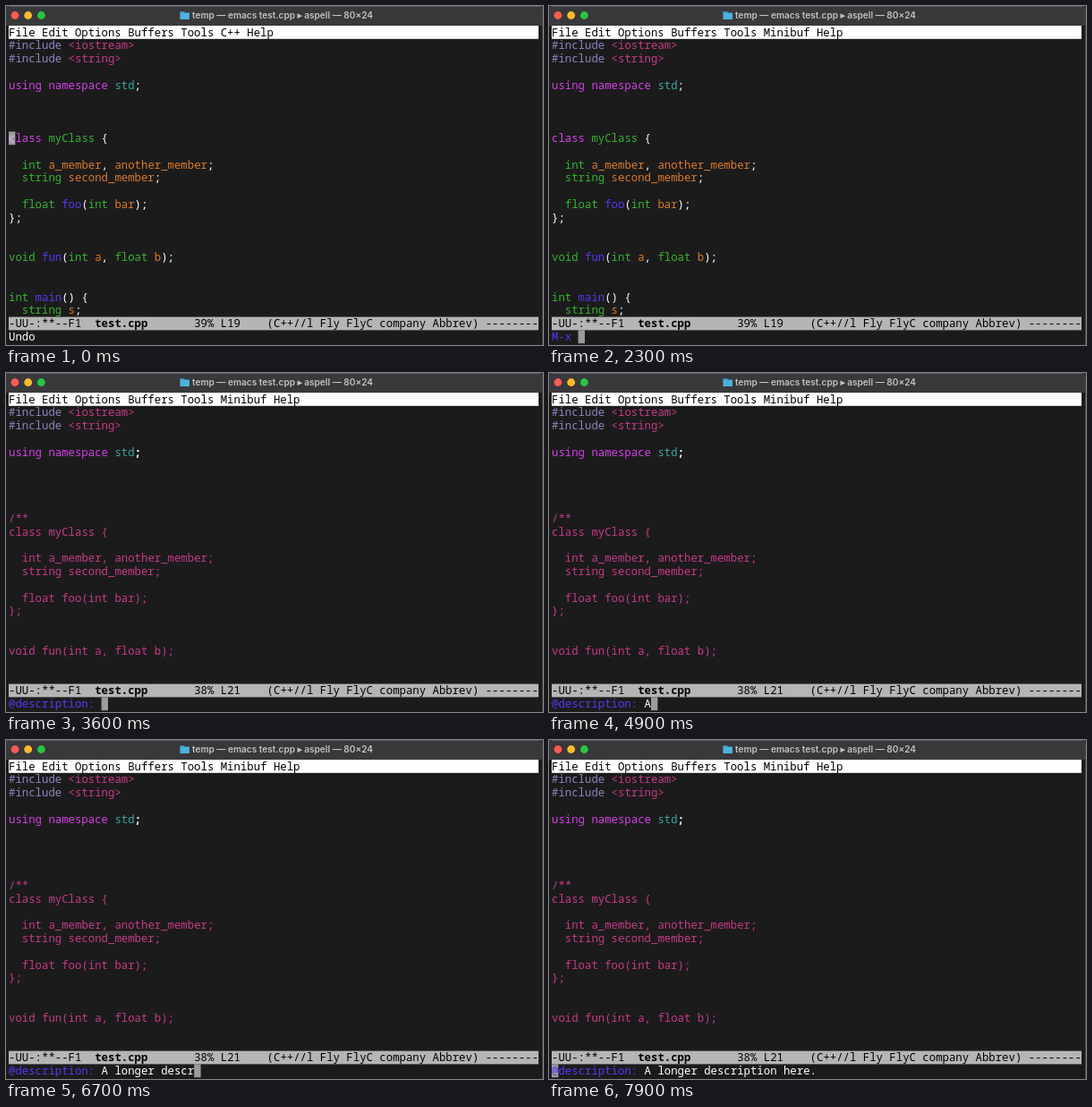
Write an HTML page with a canvas that moves like this. It is 600x379 px and loops after 8000 ms.

```html
<!DOCTYPE html>
<html lang="en">
<head>
<meta charset="utf-8">
<title>Terminal editor</title>
<style>
html, body { margin: 0; width: 100%; height: 100%; overflow: hidden; background: #1c1b1c; }
canvas { display: block; width: 600px; height: 379px; }
</style>
</head>
<body>
<canvas id="stage"></canvas>
<script>
const W = 600, H = 379, LOOP = 8000;
const X0 = 3, Y0 = 22, CW = 7.4, RH = 14.8;
const MONO = '12.33px "Noto Sans Mono", "DejaVu Sans Mono", monospace';
const C = {
  bg: '#1c1b1c', bar: '#b5b5b5', cursor: '#9c9a9c', w: '#ffffff',
  k: '#d43fe8', t: '#35b52f', v: '#d97a2b', f: '#5a35f2',
  s: '#c53b86', p: '#8c83bd', n: '#3aa79f', x: '#000000'
};

const canvas = document.getElementById('stage');
const g = canvas.getContext('2d');
const dpr = window.devicePixelRatio || 1;
canvas.width = W * dpr;
canvas.height = H * dpr;

// Each part is a colour key, a colon and its text.
const header = [
  [1, 'p:#include ', 's:<iostream>'],
  [2, 'p:#include ', 's:<string>']
];
const body = [
  [8, 'k:class ', 't:myClass ', 'w:{'],
  [10, 't:  int ', 'v:a_member', 'w:, ', 'v:another_member', 'w:;'],
  [11, 't:  string ', 'v:second_member', 'w:;'],
  [13, 't:  float ', 'f:foo', 'w:(', 't:int ', 'v:bar', 'w:);'],
  [14, 'w:};'],
  [17, 't:void ', 'f:fun', 'w:(', 't:int ', 'v:a', 'w:, ', 't:float ', 'v:b', 'w:);'],
  [20, 't:int ', 'f:main', 'w:() {'],
  [21, 't:  string ', 'v:s', 'w:;']
];
const answer = 'A longer description here.';

const T = { prompt: 1500, comment: 3200, first: 4750, rest: 5320, fast: 6650, done: 7700 };

function cell(row, col, cols, color) {
  g.fillStyle = color;
  g.fillRect(X0 + col * CW, Y0 + row * RH, cols * CW, RH);
}

function put(row, col, text, color, bold) {
  g.font = (bold ? 'bold ' : '') + MONO;
  g.fillStyle = color;
  g.fillText(text, X0 + col * CW, Y0 + row * RH + 11.6);
}

function line([row, ...parts], shift = 0, color) {
  let col = 0;
  for (const part of parts) {
    const text = part.slice(2);
    put(row + shift, col, text, color || C[part[0]]);
    col += text.length;
  }
}

function disc(x, color) {
  g.fillStyle = color;
  g.beginPath();
  g.arc(x, 10.5, 4.4, 0, 7);
  g.fill();
}

function titleBar() {
  g.fillStyle = '#39383a';
  g.fillRect(0, 0, W, Y0);
  g.fillStyle = '#5b5a5c';
  g.fillRect(4, 0, W - 8, 1);
  disc(10, '#fc5b55');
  disc(24.7, '#fdbc2e');
  disc(39.4, '#28c63f');
  g.fillStyle = '#2f8fb8';
  g.fillRect(194.5, 6, 5, 3);
  g.fillStyle = '#4bb2dc';
  g.fillRect(194.5, 7.5, 10.5, 7.5);
  g.font = '600 10.1px Inter, "Open Sans", sans-serif';
  g.fillStyle = '#c4c3c4';
  g.fillText('temp — emacs test.cpp ▸ aspell — 80×24', 208, 13.8);
}

function typed(t) {
  if (t < T.first) return 0;
  if (t < T.rest) return 1;
  const n = t < T.fast
    ? 2 + Math.floor((t - T.rest) / 110)
    : 14 + Math.floor((t - T.fast) / 80);
  return Math.min(n, answer.length);
}

function minibuffer(t) {
  if (t < T.prompt) {
    put(23, 0, 'Undo', C.w);
  } else if (t < T.comment) {
    put(23, 0, 'M-x', C.f);
    cell(23, 4, 1, C.cursor);
  } else {
    const n = typed(t);
    cell(23, t < T.done ? 14 + n : 0, 1, C.cursor);
    put(23, 0, '@description:', C.f);
    put(23, 14, answer.slice(0, n), C.w);
  }
}

function draw(t) {
  const mini = t >= T.prompt, comment = t >= T.comment;
  g.setTransform(dpr, 0, 0, dpr, 0, 0);
  g.fillStyle = C.bg;
  g.fillRect(0, 0, W, H);
  titleBar();

  cell(0, 0, 80, C.w);
  put(0, 0, `File Edit Options Buffers Tools ${mini ? 'Minibuf' : 'C++'} Help`, C.x);

  header.forEach(l => line(l));
  line([4, 'k:using namespace ', 'n:std']);
  put(4, 19, ';', C.w, comment);
  if (!mini) cell(8, 0, 1, C.cursor);
  if (comment) put(9, 0, '/**', C.s);
  for (const l of body) {
    if (!comment) line(l);
    else if (l[0] < 20) line(l, 2, C.s);
  }
  if (!mini) put(8, 0, 'c', '#f0b4f4');

  cell(22, 0, 80, C.bar);
  put(22, 0, '-UU-:**--F1', C.x);
  put(22, 13, 'test.cpp', C.x, true);
  put(22, 28, comment ? '38% L21' : '39% L19', C.x);
  put(22, 39, '(C++//l Fly FlyC company Abbrev) --------', C.x);
  minibuffer(t);

  g.fillStyle = '#4a494b';
  g.fillRect(W - 1, 4, 1, H - 4);
}

function frame(now) {
  draw(now % LOOP);
  requestAnimationFrame(frame);
}
requestAnimationFrame(frame);
</script>
</body>
</html>
```
